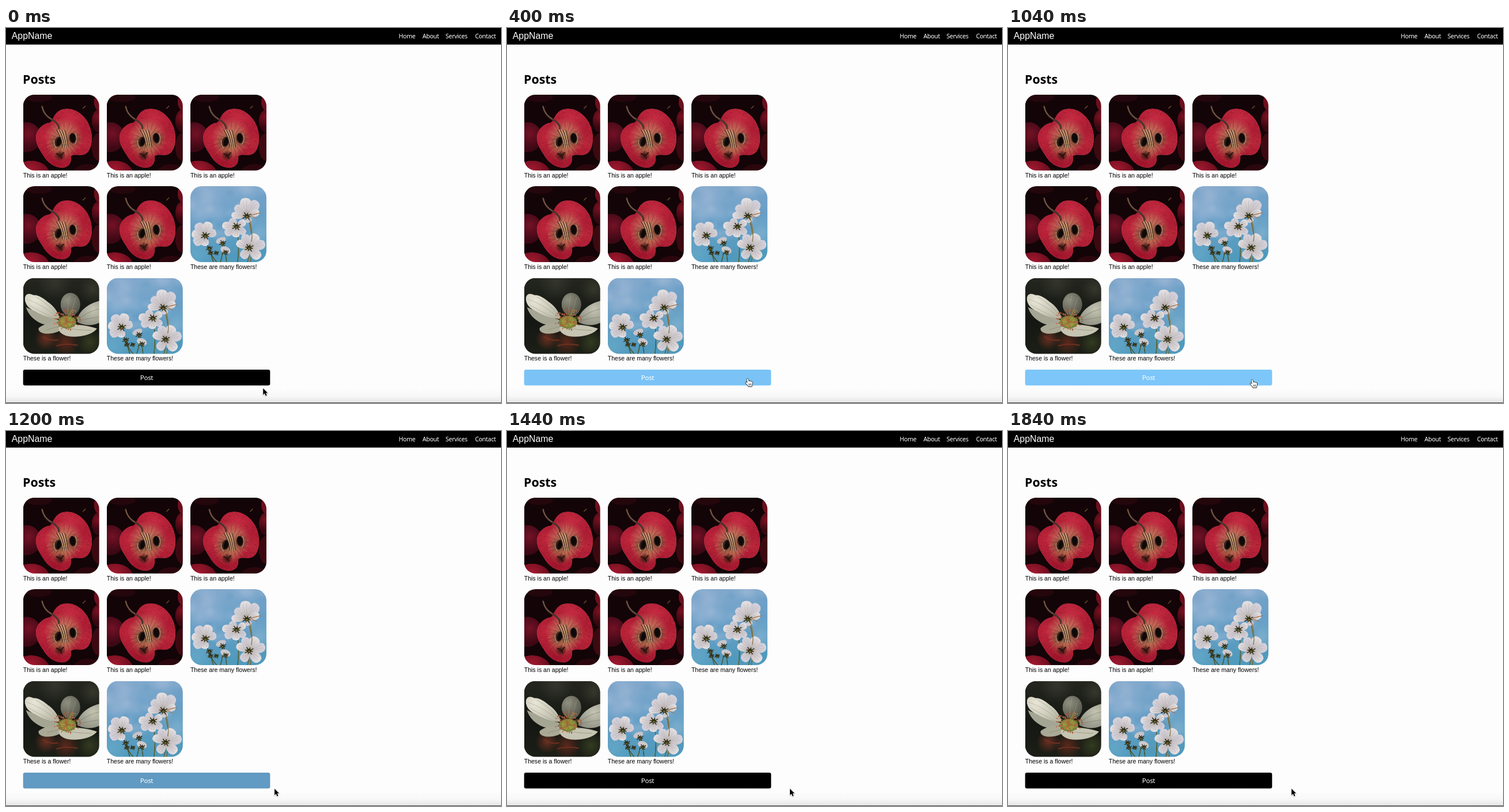
Recreate the animation shown at these times as an HTML page with a canvas. Size 859 by 652 pixels, loop 1.92 s.

```html
<!DOCTYPE html>
<html lang="en">
<head>
<meta charset="utf-8">
<title>Posts</title>
<style>
html, body { margin: 0; width: 100%; height: 100%; overflow: hidden; background: #fdfdfd; }
canvas { display: block; width: 859px; height: 652px; }
</style>
</head>
<body>
<canvas id="stage" width="859" height="652"></canvas>
<script>
const W = 859, H = 652, LOOP = 1920, STEP = 80;
const TILE = 132;
const ctx = document.getElementById('stage').getContext('2d');
const SANS = '"Liberation Sans", Arial, sans-serif';
const UI = '"Noto Sans", "Open Sans", sans-serif';

function layer(w, h) {
  const c = document.createElement('canvas');
  c.width = w;
  c.height = h;
  return c;
}

function seeded(s) {
  return () => (s = (s * 16807) % 2147483647) / 2147483647;
}

function text(g, str, x, y, font, color, align = 'left', spacing = '0px') {
  g.font = font;
  g.letterSpacing = spacing;
  g.fillStyle = color;
  g.textAlign = align;
  g.fillText(str, x, y);
}

function oval(g, x, y, rx, ry, color, turn = 0) {
  g.fillStyle = color;
  g.beginPath();
  g.ellipse(x, y, rx, ry, turn, 0, 7);
  g.fill();
}

function shape(g, d, color) {
  g.fillStyle = color;
  g.fill(new Path2D(d));
}

function line(g, d, color, width) {
  g.strokeStyle = color;
  g.lineWidth = width;
  g.lineCap = 'round';
  g.stroke(new Path2D(d));
}

function fade(g, x, y, r, inner, outer) {
  const f = g.createRadialGradient(x, y, 0, x, y, r);
  f.addColorStop(0, inner);
  f.addColorStop(1, outer);
  return f;
}

function glow(g, x, y, r, rgb, a) {
  g.fillStyle = fade(g, x, y, r, `rgba(${rgb},${a})`, `rgba(${rgb},0)`);
  g.fillRect(x - r, y - r, 2 * r, 2 * r);
}

function apple(g) {
  const rnd = seeded(41);
  g.fillStyle = '#130407';
  g.fillRect(0, 0, TILE, TILE);

  // neighbouring fruit in shadow
  oval(g, 6, 74, 25, 26, fade(g, 10, 68, 27, '#741226', '#3c0814'));
  oval(g, 14, 139, 32, 24, fade(g, 14, 132, 28, '#a41a30', '#6c0d1e'));
  oval(g, 27, 5, 23, 8, '#24070c');
  oval(g, 132, 46, 13, 20, fade(g, 130, 38, 20, '#7c1122', '#37070f'));
  oval(g, 136, 13, 13, 17, '#6c0f1d');
  oval(g, 131, 91, 12, 24, '#3d0911');
  oval(g, 112, 139, 26, 18, '#2b070d');
  line(g, 'M104 24L108 20', '#6b4b32', 1.5);

  const body = new Path2D('M46 49C52 46 52 35 63 28C72 23 86 24 96 31C110 40 118 56 119 72C120 88 115 101 106 104C98 107 89 102 83 107C84 117 81 125 70 127C54 128 41 117 34 104C27 94 20 82 23 69C27 56 38 50 46 49Z');
  g.save();
  g.clip(body);
  g.fillStyle = '#ab1c33';
  g.fillRect(0, 0, TILE, TILE);
  glow(g, 82, 40, 34, '205,48,70', 0.7);
  glow(g, 38, 74, 26, '204,45,66', 0.6);
  glow(g, 108, 84, 24, '196,48,64', 0.55);
  glow(g, 58, 120, 26, '150,14,38', 0.6);
  for (let i = 0; i < 420; i++) {
    oval(g, rnd() * 105 + 20, rnd() * 105 + 22, 1, 0.7,
      i % 2 ? 'rgba(225,90,102,.26)' : 'rgba(105,5,22,.3)');
  }
  glow(g, 71, 74, 34, '196,146,104', 0.95);
  glow(g, 66, 92, 26, '180,117,78', 0.75);
  for (let i = 0; i < 60; i++) {
    const a = i / 60 * 6.283, r = 20 + rnd() * 15;
    line(g, `M${71 + 12 * Math.cos(a)} ${78 + 12 * Math.sin(a)}L${71 + r * Math.cos(a)} ${78 + r * Math.sin(a)}`,
      i % 3 ? 'rgba(220,172,130,.3)' : 'rgba(110,42,34,.3)', 0.8);
  }
  g.restore();
  g.strokeStyle = 'rgba(205,62,78,.5)';
  g.lineWidth = 0.7;
  g.stroke(body);

  // core and seeds
  glow(g, 60, 83, 16, '92,58,40', 0.85);
  glow(g, 86, 77, 16, '92,58,40', 0.85);
  oval(g, 61, 82, 6, 9, '#3a211a', 0.3);
  oval(g, 86, 76, 6, 9, '#3a211a', -0.15);
  oval(g, 62, 82, 4, 7.5, '#0e0909', 0.3);
  oval(g, 86, 75, 4.5, 8, '#0e0909', -0.1);
  line(g, 'M91 68Q95 77 90 86M54 80Q53 88 58 93', '#b09474', 1.2);
  for (let i = 0; i < 7; i++) {
    line(g, `M${58 + i * 2.4} 62Q${66 + i * 1.6} 73 ${69 + i * 1.5} 92`, i % 2 ? '#c9aa7e' : '#4b3229', 1.2);
  }
  glow(g, 64, 106, 10, '40,16,12', 0.95);
  line(g, 'M58 103Q64 104 67 111M70 101L64 108', '#2b120e', 2);
  line(g, 'M33 21Q36 36 49 43T62 59', '#49352c', 3);
  line(g, 'M33 21Q36 35 49 42', '#8c6a53', 1);
}

function bloom(g, x, y, petals, core) {
  petals.forEach(([angle, len, wide], i) => {
    g.save();
    g.translate(x, y);
    g.rotate(angle * Math.PI / 180);
    const f = g.createLinearGradient(0, 0, len, 0);
    f.addColorStop(0, '#a39b8c');
    f.addColorStop(0.35, '#cbc5c7');
    f.addColorStop(1, i % 2 ? '#d5d3de' : '#e6e2e4');
    shape(g, `M0 0C${len * 0.25} ${-wide * 0.7} ${len * 0.7} ${-wide * 1.1} ${len * 0.95} ${-wide * 0.5}Q${len * 1.05} 0 ${len * 0.93} ${wide * 0.5}C${len * 0.7} ${wide * 1.1} ${len * 0.25} ${wide * 0.7} 0 0Z`, f);
    line(g, `M4 0L${len * 0.85} ${wide * 0.15}M4 -1L${len * 0.8} ${-wide * 0.35}`, 'rgba(145,138,152,.45)', 0.5);
    g.restore();
  });
  star(g, x, y, core);
}

function star(g, x, y, r) {
  for (let i = 0; i < 8; i++) {
    const a = i * 0.785 + 0.25, k = r * (i % 2 ? 1 : 0.75);
    line(g, `M${x} ${y}L${x + k * Math.cos(a)} ${y + k * 0.85 * Math.sin(a)}`, '#302d1b', 1.5);
  }
  oval(g, x, y, r * 0.48, r * 0.43, '#2c2c14');
  oval(g, x, y + 1, r * 0.26, r * 0.2, '#66662b');
}

function cosmos(g) {
  const rnd = seeded(17);
  const sky = g.createLinearGradient(0, 0, 25, TILE);
  sky.addColorStop(0, '#86aacd');
  sky.addColorStop(0.5, '#6ba1c8');
  sky.addColorStop(1, '#509abd');
  g.fillStyle = sky;
  g.fillRect(0, 0, TILE, TILE);
  for (let i = 0; i < 34; i++) {
    glow(g, rnd() * TILE, rnd() * 85, 9 + rnd() * 12, i % 3 ? '176,194,220' : '92,146,190', 0.28);
  }
  glow(g, 23, 27, 36, '178,194,221', 0.4);
  glow(g, 124, 80, 30, '140,185,212', 0.4);
  glow(g, 10, 120, 30, '111,177,207', 0.5);

  line(g, 'M99 53Q112 88 104 132', '#766d3c', 1.7);
  line(g, 'M80 71Q86 102 82 132', '#596339', 1.7);
  line(g, 'M26 87Q31 116 46 132M33 108L40 132M56 100Q57 119 52 132M61 116L63 132', '#4c5730', 1.5);
  line(g, 'M102 108Q103 122 99 132', '#626338', 1.5);

  bloom(g, 26, 86, [[190, 24, 10], [235, 26, 11], [285, 25, 11], [340, 20, 9], [95, 18, 9], [145, 24, 11]], 8);
  bloom(g, 102, 107, [[205, 24, 9], [250, 25, 10], [300, 27, 12], [345, 29, 11], [45, 26, 11], [125, 22, 10]], 8);
  bloom(g, 80, 70, [[185, 25, 9], [235, 17, 8], [330, 18, 8], [40, 20, 8], [95, 19, 9], [145, 24, 9]], 8);
  bloom(g, 98, 52, [[185, 27, 8], [222, 27, 10], [265, 32, 13], [305, 32, 12], [340, 23, 8], [70, 12, 7]], 8);
  line(g, 'M102 55Q109 77 106 96', '#8a7a4c', 1.4);
  line(g, 'M104 51L115 56M106 50L122 46', '#a2744b', 1.2);
  oval(g, 53, 94, 9, 5, '#c8c4c8', -0.4);
  oval(g, 61, 111, 9, 6, '#cdc9cd', 0.4);
  [[56, 99, 6], [33, 108, 6], [61, 115, 5.5], [45, 116, 4.5], [35, 116, 5]].forEach(b => star(g, ...b));
}

function whiteFlower(g) {
  const rnd = seeded(83);
  const bg = g.createLinearGradient(0, 0, 0, TILE);
  bg.addColorStop(0, '#24261f');
  bg.addColorStop(0.55, '#151713');
  bg.addColorStop(1, '#1c1f17');
  g.fillStyle = bg;
  g.fillRect(0, 0, TILE, TILE);
  glow(g, 55, 8, 30, '70,72,62', 0.5);
  glow(g, 121, 20, 24, '76,77,61', 0.5);
  glow(g, 40, 106, 20, '112,50,34', 0.9);
  glow(g, 74, 112, 24, '112,44,30', 0.75);
  glow(g, 116, 112, 24, '62,73,37', 0.7);
  line(g, 'M34 102Q46 110 60 108M58 118Q76 113 94 117', '#6f3020', 2);

  oval(g, 82, 46, 17, 20, fade(g, 76, 38, 26, '#8f8f7f', '#595b50'));
  line(g, 'M81 31Q77 49 78 65M91 34Q87 52 81 65', 'rgba(189,187,167,.35)', 0.8);
  shape(g, 'M94 70C99 57 112 45 132 40L132 78C120 84 106 83 94 77Z', fade(g, 122, 55, 36, '#c6c5b3', '#85877a'));
  line(g, 'M98 70Q114 58 132 54M98 74Q116 70 132 68', 'rgba(110,112,96,.5)', 0.9);

  // left petals, split by a shaded fold
  shape(g, 'M5 51C18 57 43 65 63 74C58 82 42 84 31 79C18 73 9 64 5 51Z', '#a5a594');
  shape(g, 'M3 36C4 27 10 26 18 30C26 29 36 36 43 42C55 50 61 61 64 71C50 71 33 66 21 58C12 54 4 49 3 36Z',
    fade(g, 20, 39, 48, '#e9e6d7', '#b6b5a3'));
  line(g, 'M6 37Q34 46 59 69M10 47Q30 59 54 70M22 33Q46 47 60 66', 'rgba(145,145,125,.5)', 0.8);
  shape(g, 'M27 87C40 77 58 76 70 82C69 92 56 97 41 97C33 97 25 93 27 87Z', '#aaa995');
  shape(g, 'M62 86C82 79 103 80 128 88C121 99 95 105 76 101C66 98 60 92 62 86Z', '#c6c4b2');
  line(g, 'M75 87Q94 91 118 91M42 90Q55 86 66 84', 'rgba(123,120,93,.6)', 0.8);

  // stamens
  oval(g, 76, 77, 16, 11, '#78843b');
  oval(g, 76, 76, 11, 9, '#95a343');
  for (let i = 0; i < 60; i++) {
    const a = rnd() * 6.283, r = 11 + rnd() * 13;
    const x = 76 + r * Math.cos(a), y = 72 + r * 0.85 * Math.sin(a);
    line(g, `M76 77Q${76 + r * 0.6 * Math.cos(a)} ${y - 2} ${x} ${y}`, i % 3 ? 'rgba(168,92,57,.65)' : 'rgba(132,142,57,.8)', 0.7);
    oval(g, x, y, 1, 1.2, i % 2 ? '#cd6848' : '#a9573b');
  }
}

function picture(draw) {
  const c = layer(TILE * 2, TILE * 2), g = c.getContext('2d');
  g.scale(2, 2);
  draw(g);
  return c;
}

function buildPage() {
  const page = layer(W, H), g = page.getContext('2d');
  g.fillStyle = '#fdfdfd';
  g.fillRect(0, 0, W, H);
  const shade = g.createLinearGradient(0, 626, 0, 651);
  shade.addColorStop(0, '#fdfdfd');
  shade.addColorStop(0.55, '#f8f8f8');
  shade.addColorStop(1, '#e5e5e5');
  g.fillStyle = shade;
  g.fillRect(0, 626, W, 25);
  g.fillStyle = '#4b4b4b';
  g.fillRect(0, 651, W, 1);
  g.fillStyle = '#000';
  g.fillRect(0, 0, W, 28.8);

  text(g, 'AppName', 9.8, 18.7, `15.84px ${SANS}`, '#fff');
  [['Home', 681.6], ['About', 722.8], ['Services', 762.8], ['Contact', 813.9]]
    .forEach(([s, x]) => text(g, s, x, 17.5, `10.56px ${UI}`, '#fff', 'left', '-0.3px'));
  text(g, 'Posts', 29, 97, `bold 21.4px ${UI}`, '#000');

  const kinds = {
    a: [picture(apple), 'This is an apple!'],
    m: [picture(cosmos), 'These are many flowers!'],
    w: [picture(whiteFlower), 'These is a flower!']
  };
  [...'aaaaamwm'].forEach((k, i) => {
    const x = 29.7 + i % 3 * 145.1, y = 115.7 + Math.floor(i / 3) * 159.4;
    const [img, label] = kinds[k];
    g.save();
    g.beginPath();
    g.roundRect(x, y, TILE, TILE, 19.8);
    g.clip();
    g.drawImage(img, x, y, TILE, TILE);
    g.restore();
    text(g, label, x, y + 143.8, `10.56px ${SANS}`, '#000');
  });
  return page;
}

// cubic-bezier(.25, .1, .25, 1)
function ease(p) {
  if (p <= 0) return 0;
  if (p >= 1) return 1;
  let lo = 0, hi = 1, u = 0.5;
  const bez = (a, b) => 3 * a * u * (1 - u) ** 2 + 3 * b * u * u * (1 - u) + u ** 3;
  for (let i = 0; i < 20; i++) {
    u = (lo + hi) / 2;
    if (bez(0.25, 0.25) < p) lo = u; else hi = u;
  }
  return bez(0.1, 1);
}

// time, x, y of the pointer tip
const path = [
  [0, 446.2, 626.5], [80, 444, 625], [160, 434, 617], [240, 422, 611], [320, 416.5, 609.5],
  [400, 415.2, 609.4], [880, 415.2, 609.4], [960, 417, 610], [1040, 421.5, 611.4], [1120, 440, 617.5],
  [1200, 466, 622], [1280, 481, 622], [1360, 488, 622], [1440, 491, 622], [1520, 492, 622], [1920, 492, 622]
];

function pointerAt(t) {
  const i = path.findIndex(p => p[0] > t);
  const a = path[i - 1], b = path[i], k = (t - a[0]) / (b[0] - a[0]);
  return [a[1] + (b[1] - a[1]) * k, a[2] + (b[2] - a[2]) * k];
}

const arrow = new Path2D('M0 0V11.2L2.6 8.8L4.4 13L6.4 12.1L4.6 8H8Z');
const hand = new Path2D('M1 1.4C1 -.2 3 -.2 3.3 1.2L4.2 5C4.5 4 6.2 4.1 6.4 5.2C6.8 4.3 8.4 4.6 8.5 5.7C9.2 5 10.4 5.5 10.5 6.7L10.6 9.2C10.5 11 9.6 11.7 9.5 13.6H3.7C3.4 11.7 1.2 10.5 -.7 8C-1.6 6.7 -.2 5.8 .8 6.6L2.1 7.8Z');

function drawPointer(x, y, onButton) {
  const outline = onButton ? hand : arrow;
  ctx.save();
  ctx.translate(x, y);
  ctx.lineJoin = 'round';
  ctx.shadowColor = 'rgba(0,0,0,.3)';
  ctx.shadowBlur = 1.5;
  ctx.shadowOffsetY = 0.7;
  ctx.lineWidth = onButton ? 1.3 : 1.5;
  ctx.strokeStyle = onButton ? '#111' : '#fff';
  ctx.stroke(outline);
  ctx.shadowColor = 'transparent';
  ctx.fillStyle = onButton ? '#fff' : '#000';
  ctx.fill(outline);
  if (onButton) line(ctx, 'M4.6 9V11.8M6.4 9V11.8M8.2 9V11.8', '#222', 0.7);
  ctx.restore();
}

const page = buildPage();

function draw(now) {
  const t = Math.floor(now % LOOP / STEP) * STEP;
  const blue = ease((t - 145) / 300) * (1 - ease((t - 1150) / 300));
  ctx.drawImage(page, 0, 0);
  ctx.fillStyle = `rgb(${[125, 198, 249].map(v => Math.round(v * blue))})`;
  ctx.beginPath();
  ctx.roundRect(29.7, 594, 428.6, 27.5, 3.3);
  ctx.fill();
  text(ctx, 'Post', 244, 612, `11.5px ${UI}`, '#fff', 'center', '-0.3px');
  drawPointer(...pointerAt(t), t >= 160 && t < 1200);
}

const start = performance.now();
function tick() {
  draw(performance.now() - start);
  requestAnimationFrame(tick);
}
tick();
</script>
</body>
</html>
```
